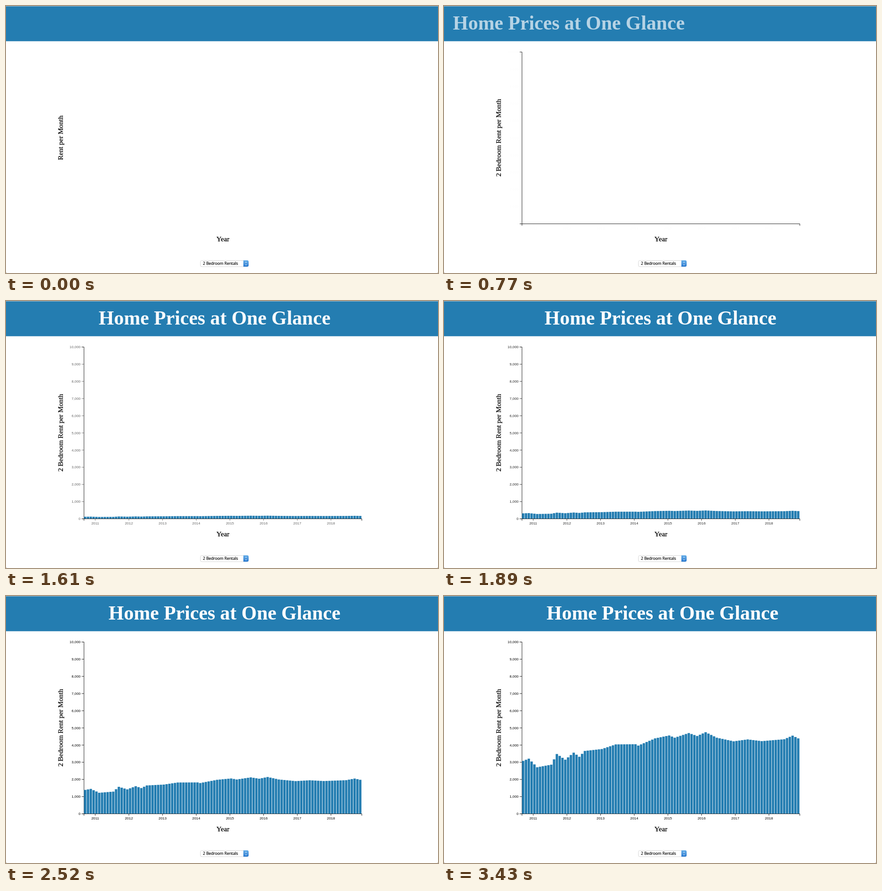
Write an HTML page with a canvas that moves like this. It is 950 px wide and 589 px high and loops after 3500 ms.

```html
<!DOCTYPE html>
<html lang="en">
<head>
<meta charset="utf-8">
<title>Home Prices at One Glance</title>
<style>
html, body { margin: 0; width: 100%; height: 100%; overflow: hidden; background: #fff; }
canvas { display: block; }
</style>
</head>
<body>
<canvas id="stage" width="950" height="589"></canvas>
<script>
const ctx = document.getElementById('stage').getContext('2d');
const LOOP = 3500, STEP = 70;
const BLUE = '#247db1';
const SERIF = '"Liberation Serif", "Times New Roman", serif';
const SANS = '"Liberation Sans", Arial, sans-serif';
const UI = '"Open Sans", "Noto Sans", sans-serif';

// Chart frame
const LEFT = 171.5, RIGHT = 782.5, TOP = 101.5, BASE = 480.5;
const MONTHS = 99, PITCH = (RIGHT - LEFT) / MONTHS;
const UNIT = (BASE - TOP) / 100;

// Timing in ms
const LOADED = 400;
const TITLE = { start: -107, length: 2250, travel: 620 };
const TICKS = { start: 430, length: 2200 };
const BARS = { start: 919, length: 3400 };

// Turning points of the rent: [month, hundreds of dollars]
const turns = [
  [0, 30.7], [2, 32], [5, 27], [10, 28.5], [12, 34.7], [15, 31.4],
  [18, 35.5], [20, 33.1], [22, 36.5], [28, 37.6], [33, 40.3], [40, 40.4],
  [41, 39.6], [47, 43.8], [52, 45.5], [54, 44.2], [59, 46.9], [62, 45.2],
  [65, 47.4], [69, 44.2], [75, 42.1], [80, 43.2], [85, 42.2], [93, 43.3],
  [96, 45.4], [98, 43.8]
];

function rentAt(month) {
  const i = Math.max(1, turns.findIndex(([m]) => m >= month));
  const [m0, r0] = turns[i - 1], [m1, r1] = turns[i];
  return r0 + (r1 - r0) * (month - m0) / (m1 - m0);
}

const progress = (t, { start, length }) =>
  Math.min(1, Math.max(0, (t - start) / length));

const cubicInOut = x => x < 0.5 ? 4 * x ** 3 : 1 - 4 * (1 - x) ** 3;

// CSS "ease": cubic-bezier(.25, .1, .25, 1)
function ease(x) {
  let lo = 0, hi = 1;
  const curve = (a, b, u) =>
    3 * a * u * (1 - u) ** 2 + 3 * b * u * u * (1 - u) + u ** 3;
  for (let i = 0; i < 24; i++) {
    const mid = (lo + hi) / 2;
    if (curve(0.25, 0.25, mid) < x) lo = mid; else hi = mid;
  }
  return curve(0.1, 1, (lo + hi) / 2);
}

const GROWN = cubicInOut(progress(LOOP - STEP, BARS));

// "heavy" thickens the strokes slightly
function label(text, x, y, font, { align = 'center', color = '#000', heavy = 0 } = {}) {
  ctx.font = font;
  ctx.textAlign = align;
  ctx.fillStyle = ctx.strokeStyle = color;
  ctx.fillText(text, x, y);
  if (heavy) {
    ctx.lineWidth = heavy;
    ctx.strokeText(text, x, y);
  }
}

function line(points, color = '#000', width = 0.85) {
  ctx.beginPath();
  points.forEach(([x, y]) => ctx.lineTo(x, y));
  ctx.strokeStyle = color;
  ctx.lineWidth = width;
  ctx.stroke();
}

function drawHeader(t) {
  ctx.fillStyle = BLUE;
  ctx.fillRect(0, 0, 950, 77.7);
  ctx.fillStyle = '#a3bfcf';
  ctx.fillRect(0, 0, 950, 1);
  if (t < 2 * STEP) return;
  const p = ease(progress(t, TITLE));
  ctx.globalAlpha = p;
  label('Home Prices at One Glance', 480.5 - TITLE.travel * (1 - p), 52,
    'bold 43.3px ' + SERIF, { color: '#fff' });
  ctx.globalAlpha = 1;
}

function drawAxes(t) {
  ctx.globalAlpha = cubicInOut(progress(t, TICKS));
  for (let i = 0; i <= 10; i++) {
    const y = BASE - i * 10 * UNIT;
    line([[166.5, y], [LEFT, y]]);
    label((i * 1000).toLocaleString('en-US'), 164, y + 2.6, '7.9px ' + SANS,
      { align: 'right' });
  }
  for (let i = 0; i < 8; i++) {
    const x = LEFT + (4 + 12 * i) * PITCH;
    line([[x, BASE], [x, 484.7]]);
    label(2011 + i, x, 492.5, '7.9px ' + SANS);
  }
  ctx.globalAlpha = 1;
  line([[166.5, TOP], [LEFT, TOP], [LEFT, BASE], [166.5, BASE]]);
  line([[LEFT, 484.7], [LEFT, BASE], [RIGHT, BASE], [RIGHT, 484.7]]);
}

function drawBars(t) {
  const grow = cubicInOut(progress(t, BARS)) / GROWN;
  ctx.fillStyle = BLUE;
  for (let i = 0; i < MONTHS; i++) {
    const h = rentAt(i) * UNIT * grow;
    ctx.fillRect(LEFT + i * PITCH, BASE - 0.4 - h, PITCH - 0.9, h);
  }
}

function drawCaptions(t) {
  const font = '15.5px ' + SERIF;
  label('Year', 477, 518.5, font, { heavy: 0.25 });
  ctx.save();
  ctx.translate(124.7, 290.7);
  ctx.rotate(-Math.PI / 2);
  label((t < LOADED ? '' : '2 Bedroom ') + 'Rent per Month', 0, 0, font, { heavy: 0.25 });
  ctx.restore();
}

function drawSelect() {
  ctx.beginPath();
  ctx.roundRect(427.5, 561.5, 105.5, 13.5, 3);
  ctx.fillStyle = '#fff';
  ctx.fill();
  ctx.strokeStyle = '#d6d6d6';
  ctx.lineWidth = 1;
  ctx.stroke();

  const shade = ctx.createLinearGradient(0, 561, 0, 575);
  shade.addColorStop(0, '#66aee8');
  shade.addColorStop(1, '#2a79cf');
  ctx.beginPath();
  ctx.roundRect(522, 561, 11.5, 14, [0, 3, 3, 0]);
  ctx.fillStyle = shade;
  ctx.fill();
  for (const dir of [-1, 1]) {
    const y = 568.1 + dir * 1.5;
    line([[525.9, y], [527.8, y + dir * 2], [529.7, y]], '#fff', 0.95);
  }
  label('2 Bedroom Rentals', 433, 571.2, '8.7px ' + UI, { align: 'left', heavy: 0.2 });
}

function draw(t) {
  ctx.fillStyle = '#fff';
  ctx.fillRect(0, 0, 950, 589);
  drawHeader(t);
  if (t >= LOADED) {
    drawAxes(t);
    drawBars(t);
  }
  drawCaptions(t);
  drawSelect();
  ctx.fillStyle = '#777';
  ctx.fillRect(0, 588, 1, 1);
  ctx.fillRect(949, 588, 1, 1);
}

const begin = performance.now();
function tick() {
  const t = (performance.now() - begin) % LOOP;
  draw(Math.floor(t / STEP) * STEP);
  requestAnimationFrame(tick);
}
tick();
</script>
</body>
</html>
```
